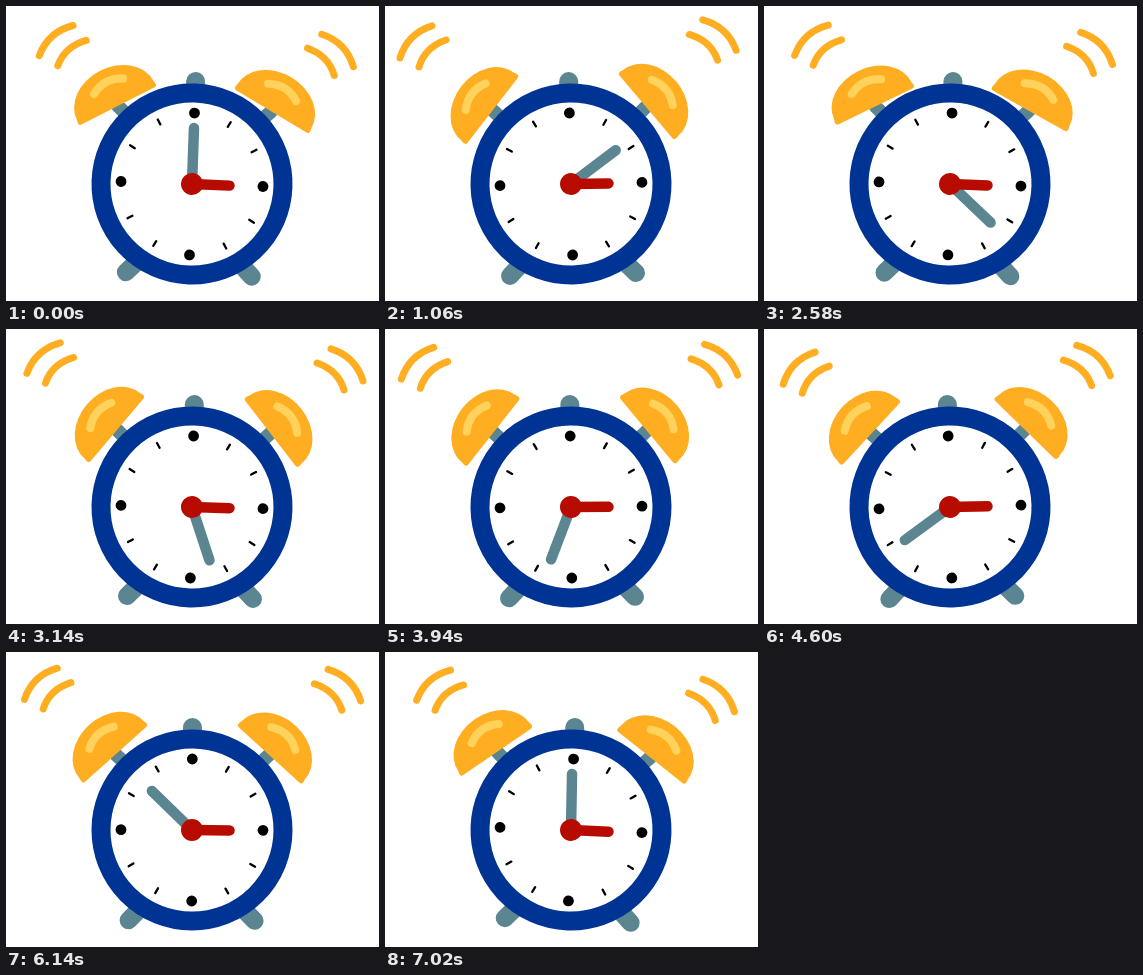
An HTML page that plays this animation: 373 px wide and 295 px high, repeating every 7040 ms.

```html
<!DOCTYPE html>
<html lang="en">
<head>
<meta charset="utf-8">
<title>Alarm clock</title>
<style>
  html, body { margin: 0; width: 100%; height: 100%; overflow: hidden; background: #fff; }
  svg { display: block; width: 100vw; height: 100vh; }
  .steel { stroke: #5b8691; }
  .gold { stroke: #ffae22; }
  .red { stroke: #b70b00; }
  .line { fill: none; stroke-linecap: round; }
</style>
</head>
<body>
<svg viewBox="0 0 373 295">
  <defs>
    <g id="side">
      <path class="line steel" stroke-width="13.5" d="M109.3 102.6L124 116.5"/>
      <path class="line steel" stroke-width="18" d="M123 268.5L142 249"/>
      <g class="bell">
        <path fill="#ffae22" d="M-41 0Q-45 0 -43 -6A43 33.5 0 0 1 43 -6Q45 0 41 0Z"/>
        <path class="line" stroke="#ffd25c" stroke-width="8" d="M-16 -21.5Q0 -31.5 17 -22"/>
      </g>
      <g class="waves line gold" stroke-width="7">
        <path d="M17.9 48.1Q26 24 50.6 16.8"/>
        <path d="M36.7 57.5Q43 38 64.3 31.2"/>
      </g>
    </g>
  </defs>
  <g id="clock">
    <path class="line steel" stroke-width="19" d="M186 75.5V90"/>
    <g id="left"></g>
    <g id="right" transform="translate(372 0) scale(-1 1)"></g>
    <circle cx="186" cy="178" r="91" fill="#fff" stroke="#003494" stroke-width="19"/>
    <g id="marks" transform="translate(186 178)"></g>
    <path id="minute" class="line steel" stroke-width="10.5" d="M186 178V122"/>
    <path class="line red" stroke-width="10.5" d="M186 178L223.5 178.3"/>
    <circle cx="186" cy="178" r="11" fill="#b70b00"/>
  </g>
</svg>
<script>
  const STEP = 20, STEPS = 352;
  const $ = id => document.getElementById(id);

  // Both sides share one drawing; the right one is mirrored.
  const side = $('side');
  for (const id of ['left', 'right']) {
    for (const part of side.children) $(id).append(part.cloneNode(true));
  }
  side.remove();

  let marks = '';
  for (let a = 0; a < 360; a += 30) {
    marks += a % 90
      ? `<path class="line" stroke="#000" stroke-width="2.3" d="M0 -73V-67.5" transform="rotate(${a})"/>`
      : `<circle cy="-71" r="5.4" transform="rotate(${a})"/>`;
  }
  $('marks').innerHTML = marks;

  const bells = document.querySelectorAll('.bell');
  const waves = document.querySelectorAll('.waves');

  // The even shake is interrupted by one slow drift: [step, degrees]
  const drift = [[191.3, 2.1], [199.3, -1.3], [254, -1.6], [268, .3], [279.3, -2.1]];

  function sway(k) {
    for (let i = 1; i < drift.length; i++) {
      const [k0, a0] = drift[i - 1], [k1, a1] = drift[i];
      if (k >= k0 && k < k1) {
        const ease = (1 - Math.cos(Math.PI * (k - k0) / (k1 - k0))) / 2;
        return a0 + (a1 - a0) * ease;
      }
    }
    return 2.1 * Math.cos((k + .7) * Math.PI / 8);
  }

  function draw(now) {
    const k = Math.floor(now / STEP) % STEPS;
    const tilt = 39.3 - 12.05 * Math.cos((k - .7) * Math.PI / 4);
    const pull = (Math.cos(k * Math.PI / 4) + .707) / 1.707;

    $('clock').setAttribute('transform', `rotate(${sway(k)} 186 178)`);
    $('minute').setAttribute('transform', `rotate(${k * 360 / STEPS} 186 178)`);
    bells.forEach(b => b.setAttribute('transform', `translate(109.3 102.6) rotate(${-tilt})`));
    waves.forEach(w => w.setAttribute('transform', `translate(${11 * pull} ${7 * pull})`));
  }

  function loop() {
    draw(performance.now());
    requestAnimationFrame(loop);
  }
  draw(0);
  requestAnimationFrame(loop);
</script>
</body>
</html>
```
